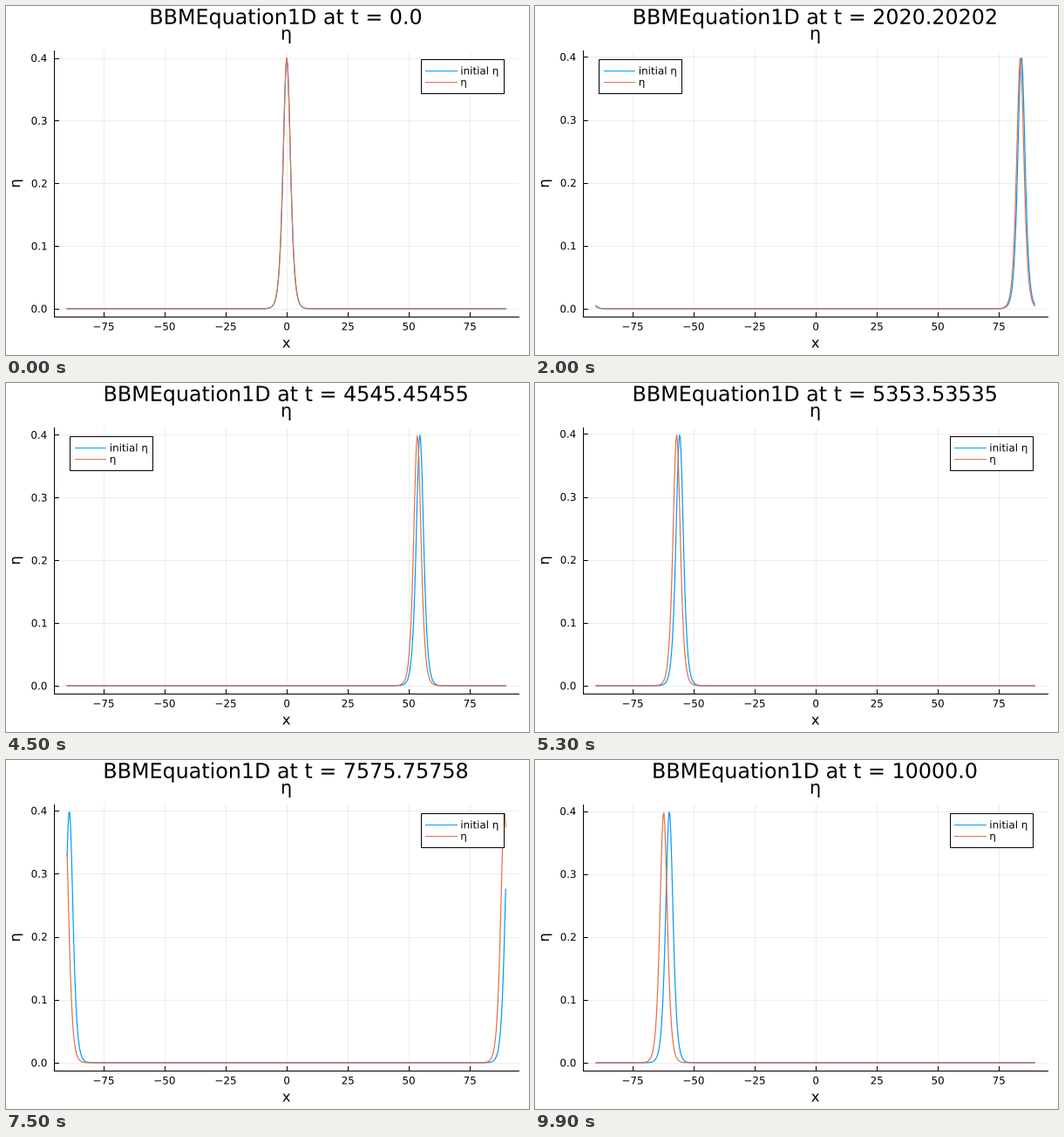
A matplotlib script that plays this animation: 600 px wide and 400 px high, repeating every 10000 ms.

```python
import numpy as np
import matplotlib.pyplot as plt
from matplotlib.animation import FuncAnimation
from matplotlib.patches import PathPatch, Rectangle
from matplotlib.textpath import TextPath
from matplotlib.transforms import Affine2D

plt.rcParams["font.family"] = "DejaVu Sans"
plt.rcParams["path.simplify"] = False

W, H, DPI = 600, 400, 100
FRAMES, INTERVAL, T_END = 100, 100, 10000.0
LEFT, RIGHT, TOP, BOTTOM = 55.0, 588.3, 51.0, 355.6
MID = (LEFT + RIGHT) / 2
BLUE, ORANGE = "#009AFA", "#E36F47"
TITLE, SUBTITLE, GUIDE, SMALL = 23.8, 20.8, 16.4, 11.9

# Solitary wave on a periodic domain
X0, LENGTH, N = -90.0, 180.0, 512
SPEED, HEIGHT, K = 1.2, 0.4, 0.5
LAG = 2.33e-4
x = X0 + LENGTH / N * np.arange(N)


def soliton(center, height=HEIGHT):
    d = (x - center - X0) % LENGTH + X0
    return height / np.cosh(K * d) ** 2


def padded(lo, hi, pad=0.03):
    return lo - pad * (hi - lo), hi + pad * (hi - lo)


XLIM = padded(x[0], x[-1])


def fraction(v, lim):
    return (v - lim[0]) / (lim[1] - lim[0])


def px(v):
    return LEFT + fraction(v, XLIM) * (RIGHT - LEFT)


def py(v, ylim):
    return BOTTOM - fraction(v, ylim) * (BOTTOM - TOP)


fig = plt.figure(figsize=(W / DPI, H / DPI), dpi=DPI, facecolor="white")
ax = fig.add_axes([0, 0, 1, 1])
ax.set_xlim(0, W)
ax.set_ylim(H, 0)
ax.axis("off")


def line(xs, ys, color="black", width=1.0, z=2, **kw):
    return ax.plot(xs, ys, color=color, lw=width * 72 / DPI, zorder=z, **kw)[0]


def text(s, tx, ty, size, align="center", angle=0, z=4):
    """Outline text with its baseline at ty, in stage pixels."""
    path = TextPath((0, 0), s, size=size)
    box = path.get_extents()
    shift = {"left": 0, "center": -(box.x0 + box.x1) / 2, "right": -box.x1}[align]
    move = Affine2D().translate(shift, 0).rotate_deg(angle).scale(1, -1)
    path = move.translate(tx, ty).transform_path(path)
    return ax.add_patch(PathPatch(path, fc="black", lw=0, zorder=z))


def grid_line(xs, ys):
    return line(xs, ys, width=1, z=1, alpha=0.07, snap=True)


def number(v):
    return str(v).replace("-", "\u2212")


def draw_frame_parts():
    line([LEFT, RIGHT], [BOTTOM, BOTTOM], z=5, snap=True)
    line([LEFT, LEFT], [TOP, BOTTOM], z=5, snap=True)
    for v in range(-75, 76, 25):
        tx = px(v)
        grid_line([tx, tx], [TOP, BOTTOM])
        line([tx, tx], [BOTTOM, BOTTOM - 5], z=5, snap=True)
        text(number(v), tx, 371.5, SMALL)
    text("η", MID, 38.6, SUBTITLE)
    text("x", MID, 391.5, GUIDE)
    text("η", 16, 203.3, GUIDE, angle=90)


def draw_y_axis(ylim):
    parts = []
    for v in np.arange(5) / 10:
        ty = py(v, ylim)
        parts += [
            grid_line([LEFT, RIGHT], [ty, ty]),
            line([LEFT, LEFT + 5], [ty, ty], z=5, snap=True),
            text(f"{v:.1f}", 46.6, ty + 4.35, SMALL, "right"),
        ]
    return parts


def legend_on_left(curves, ylim):
    """Use the corner holding the fewest points; ties go to the right."""
    fx = fraction(x, XLIM)
    left = right = 0
    for y in curves:
        high = fraction(y, ylim) > 0.75
        left += np.sum(high & (fx < 0.25))
        right += np.sum(high & (fx > 0.75))
    return left < right


def draw_legend(on_left):
    bx = 73.0 if on_left else 475.5
    box = Rectangle((bx, 61), 95, 39, fc="white", ec="black",
                    lw=72 / DPI, zorder=6, snap=True)
    parts = [ax.add_patch(box)]
    for ly, label, color in ((74, "initial η", BLUE), (87, "η", ORANGE)):
        parts += [
            line([bx + 5.7, bx + 41], [ly, ly], color, z=7),
            text(label, bx + 45.8, ly + 4.4, SMALL, "left", z=7),
        ]
    return parts


draw_frame_parts()
curve_a = line([], [], BLUE, 1.2, 2)
curve_b = line([], [], ORANGE, 1.2, 3)
moving = []


def update(i):
    while moving:
        moving.pop().remove()
    t = i * T_END / (FRAMES - 1)
    center = SPEED * t
    height = HEIGHT - 0.0015 * (1 - np.exp(-t / 300))
    exact = soliton(center)
    solved = soliton(center - LAG * t, height)
    ylim = padded(0, max(exact.max(), solved.max()))
    curve_a.set_data(px(x), py(exact, ylim))
    curve_b.set_data(px(x), py(solved, ylim))
    title = f"BBMEquation1D at t = {round(t, 5)}"
    moving.append(text(title, MID - 0.3, 20.7, TITLE))
    moving.extend(draw_y_axis(ylim))
    moving.extend(draw_legend(legend_on_left((exact, solved), ylim)))
    return [curve_a, curve_b, *moving]


anim = FuncAnimation(fig, update, frames=FRAMES, interval=INTERVAL,
                     init_func=lambda: [], repeat=True, repeat_delay=0)
plt.show()
```
